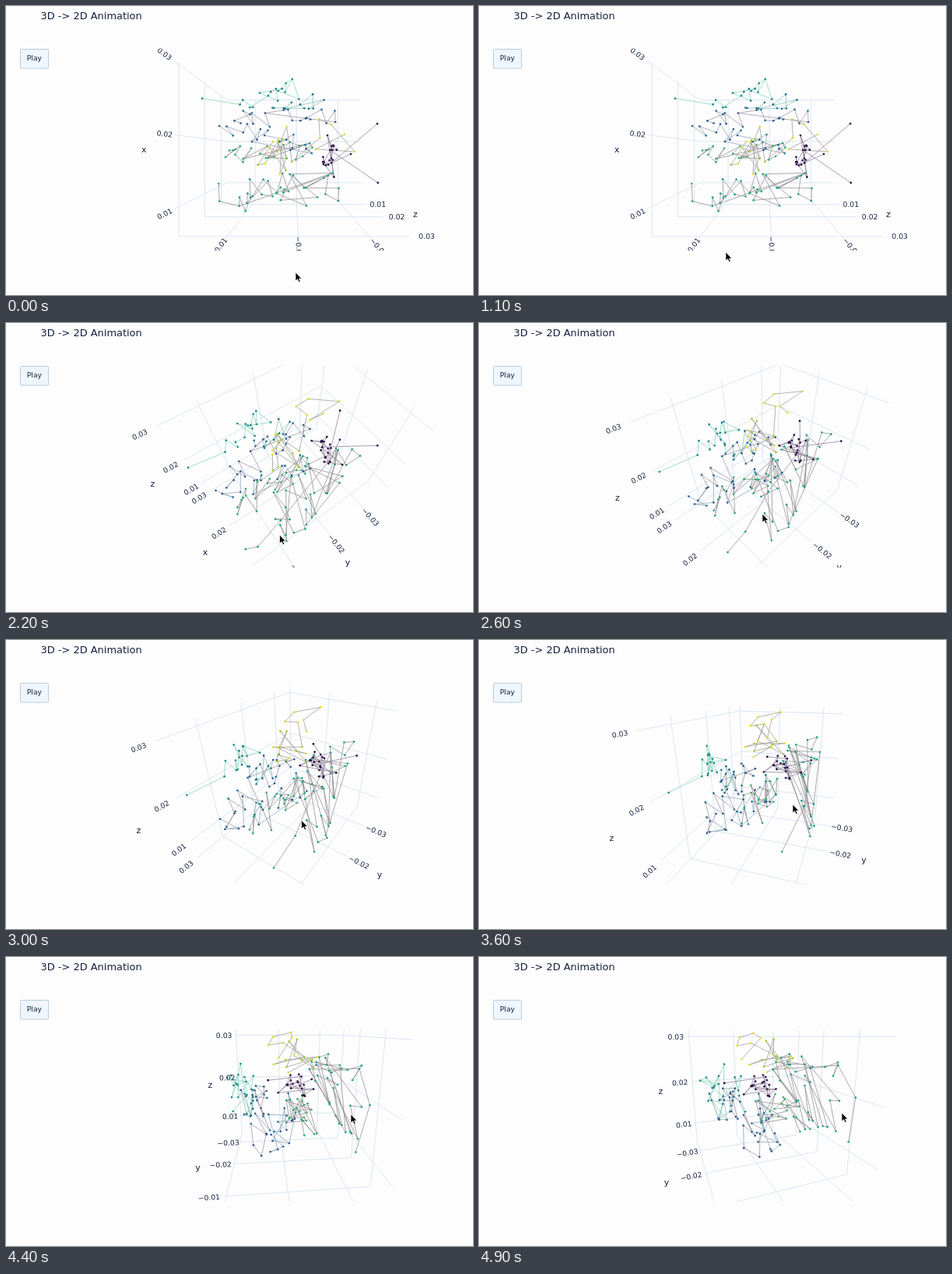
An HTML page for the animation above (5000 ms loop, 600 px wide and 371 px high).

```html
<!DOCTYPE html>
<html lang="en">
<head>
<meta charset="utf-8">
<title>3D -> 2D Animation</title>
<style>
  html, body { margin: 0; width: 100%; height: 100%; overflow: hidden; background: #fdfdfe; }
  svg { display: block; width: 600px; height: 371px; font-family: "DejaVu Sans", Verdana, sans-serif; fill: #14213d; }
  .tick { font-size: 9.2px; text-anchor: middle; dominant-baseline: central; }
  .name { font-size: 11px; text-anchor: middle; dominant-baseline: central; }
</style>
</head>
<body>
<svg id="stage" viewBox="0 0 600 371">
  <clipPath id="plot"><rect x="155" y="54.5" width="425" height="259.5"/></clipPath>
  <text x="44.5" y="17.2" font-size="12.95">3D -&gt; 2D Animation</text>
  <rect x="18.5" y="55.5" width="36" height="24.5" rx="1" fill="#eff6fd" stroke="#a9c2d6" stroke-width=".8"/>
  <text x="36.4" y="70.4" font-size="9.2" text-anchor="middle">Play</text>
  <g id="scene" clip-path="url(#plot)"></g>
  <path id="cursor" d="M0 0V11L2.6 8.7 4.4 12.6 6.2 11.8 4.5 8.1H7.8Z" fill="#000" stroke="#fff" stroke-width=".7"/>
</svg>
<script>
const LOOP = 5000, STEP = 100;
const CENTER = [370, 184.5], FOCAL = 313, DIST = 4.6;
const HALF = [1.62, 1.22, 1.3];

// one stop of the drag: when, where the pointer is, and the view it gives
const stop = (time, x, y, azimuth, elevation) => ({ time, x, y, azimuth, elevation });
const STOPS = [
  stop(0, 372, 342, 90, 90),
  stop(1100, 317, 316, 90, 90),
  stop(1800, 339, 299, 63.5, 80),
  stop(2600, 364, 245, 45, 43),
  stop(3600, 403, 211, 17.5, 21),
  stop(4400, 443, 202, -6, 16),
  stop(4900, 466, 200, -21.5, 14.8)
];

const makeAxis = (name, first, sign) => ({
  name,
  ticks: [0, 1, 2].map(i => first + i),
  text: [1, 2, 3].map(i => `${sign}0.0${i}`)
});
const AXES = [makeAxis('y', -.94, '−'), makeAxis('x', -.8, ''), makeAxis('z', -.83, '')];

// each strand wanders from one point to another; fan is the share of links to its end
const STRANDS = [
  { count: 16, from: [-1.2, .75, .5], to: [0, 1.1, .45], spread: [.4, .17, .35],
    fan: .2, dots: ['#21808c', '#1f8f88'], line: '#8ad6bb' },
  { count: 12, from: [-.5, .75, .1], to: [.5, .95, -.15], spread: [.15, .15, .3],
    fan: .1, dots: ['#23778d', '#2a658d'], line: '#8fc4b8' },
  { count: 18, from: [-1.2, .6, -.1], to: [.8, .62, -.1], spread: [.2, .15, .35],
    fan: .1, dots: ['#2a6f8e', '#31598c'], line: '#a299a8' },
  { count: 18, from: [-1.45, .45, -.2], to: [.4, .05, -.2], spread: [.22, .15, .3],
    fan: .12, dots: ['#31598c', '#23778d'], line: '#93aab9' },
  { count: 22, from: [-1.4, -.12, -.1], to: [.2, .03, -.15], spread: [.25, .2, .4],
    fan: .15, dots: ['#3fae6e', '#2ba67f'], line: '#979194' },
  { count: 34, from: [-1.2, -.75, .1], to: [.6, -.58, .3], spread: [.35, .3, .75],
    fan: .18, dots: ['#1f9e89', '#2ba67f'], line: '#979395' },
  { count: 19, from: [-.6, -.15, .8], to: [.65, .2, .9], spread: [.35, .45, .35],
    fan: 0, dots: ['#e6dd2b', '#a5c932'], line: '#a3a098' },
  { count: 18, from: [.6, .12, .1], to: [.7, -.4, .15], spread: [.15, .2, .25],
    fan: .15, dots: ['#30104f', '#1d0b2e'], line: '#93869b',
    tips: [[1.54, .48, .1], [1.55, -.61, .1], [1.05, -.08, .1]] }
];

let seed = 7;
function random() {
  seed = (seed * 16807) % 2147483647;
  return seed / 2147483647;
}

const mix = (a, b, k) => a + (b - a) * k;

function add(parent, tag, attrs = {}) {
  const node = document.createElementNS('http://www.w3.org/2000/svg', tag);
  for (const key in attrs) node.setAttribute(key, attrs[key]);
  return parent.appendChild(node);
}

const scene = document.getElementById('scene');
const cursor = document.getElementById('cursor');
const grid = add(scene, 'path', { fill: 'none', stroke: '#d9e4ee', 'stroke-width': .9 });

function buildStrand(strand) {
  const { count, from, to, spread, fan, tips = [] } = strand;
  const points = [], links = [];
  const last = count - 1;
  for (let i = 0; i < count; i++) {
    points.push(from.map((v, n) => mix(v, to[n], i / last) + (random() * 2 - 1) * spread[n]));
    if (i < last) links.push([i, i + 1]);
    if (random() < fan) links.push([i, last]);
  }
  for (const tip of tips) {
    links.push([Math.floor(random() * count), points.length]);
    points.push(tip);
  }
  return { ...strand, points, links };
}

const strands = STRANDS.map(buildStrand);
for (const s of strands) s.path = add(scene, 'path', { fill: 'none', stroke: s.line, 'stroke-width': .8 });
for (const s of strands) {
  s.circles = s.points.map(() => add(scene, 'circle', { r: 1.35, fill: s.dots[random() < .6 ? 0 : 1] }));
}
for (const axis of AXES) {
  axis.labels = axis.text.map(text => {
    const node = add(scene, 'text', { class: 'tick' });
    node.textContent = text;
    return node;
  });
  axis.title = add(scene, 'text', { class: 'name' });
  axis.title.textContent = axis.name;
}

function sample(t) {
  let i = 0;
  while (i < STOPS.length - 2 && t >= STOPS[i + 1].time) i++;
  const a = STOPS[i], b = STOPS[i + 1];
  const k = (t - a.time) / (b.time - a.time);
  const pose = {};
  for (const key in a) pose[key] = mix(a[key], b[key], k);
  return pose;
}

function camera({ azimuth, elevation }) {
  const rad = Math.PI / 180;
  const sa = Math.sin(azimuth * rad), ca = Math.cos(azimuth * rad);
  const se = Math.sin(elevation * rad), ce = Math.cos(elevation * rad);
  const project = ([x, y, z]) => {
    const away = ca * x + sa * y;
    const scale = FOCAL / (DIST + away * ce - z * se);
    return [CENTER[0] + (sa * x - ca * y) * scale, CENTER[1] - (away * se + z * ce) * scale];
  };
  // the sides of the box that lie behind the data
  const back = [ca * ce > 1e-3 ? 1 : -1, sa * ce > 1e-3 ? 1 : -1, -1];
  return { project, back, top: ce < 1e-3 };
}

const pair = p => p[0].toFixed(1) + ' ' + p[1].toFixed(1);
const segment = (a, b) => 'M' + pair(a) + 'L' + pair(b);

function drawGrid({ project, back }) {
  let d = '';
  for (let wall = 0; wall < 3; wall++) {
    for (let axis = 0; axis < 3; axis++) {
      if (axis === wall) continue;
      const along = 3 - wall - axis;
      for (const tick of AXES[axis].ticks) {
        const ends = [-1, 1].map(side => {
          const p = [];
          p[wall] = back[wall] * HALF[wall];
          p[axis] = tick;
          p[along] = side * HALF[along];
          return project(p);
        });
        d += segment(...ends);
      }
    }
  }
  grid.setAttribute('d', d);
}

function drawLabels({ project, back, top }) {
  const outward = [top ? 2 : 1, top ? 2 : 0, back[0] === back[1] ? 0 : 1];
  AXES.forEach((axis, a) => {
    const out = outward[a];
    const place = (value, gap) => {
      const p = back.map((side, n) => side * HALF[n]);
      p[out] = -back[out] * (HALF[out] + gap);
      p[a] = value;
      return project(p);
    };
    axis.ticks.forEach((tick, n) => {
      const from = place(tick, 0), to = place(tick, .25);
      let angle = Math.atan2(to[1] - from[1], to[0] - from[0]) * 180 / Math.PI;
      if (angle > 90) angle -= 180;
      if (angle < -90) angle += 180;
      axis.labels[n].setAttribute('transform', `translate(${pair(to)}) rotate(${angle.toFixed(1)})`);
    });
    axis.title.setAttribute('transform', `translate(${pair(place(0, .67))})`);
  });
}

function drawData({ project }) {
  for (const s of strands) {
    const flat = s.points.map(project);
    s.path.setAttribute('d', s.links.map(([a, b]) => segment(flat[a], flat[b])).join(''));
    flat.forEach((p, i) => {
      s.circles[i].setAttribute('cx', p[0].toFixed(1));
      s.circles[i].setAttribute('cy', p[1].toFixed(1));
    });
  }
}

function draw(time) {
  const pose = sample(Math.floor((time % LOOP) / STEP) * STEP);
  const view = camera(pose);
  drawGrid(view);
  drawLabels(view);
  drawData(view);
  cursor.setAttribute('transform', `translate(${pose.x.toFixed(1)} ${pose.y.toFixed(1)})`);
}

const start = performance.now();
function loop() {
  draw(performance.now() - start);
  requestAnimationFrame(loop);
}
loop();
</script>
</body>
</html>
```
